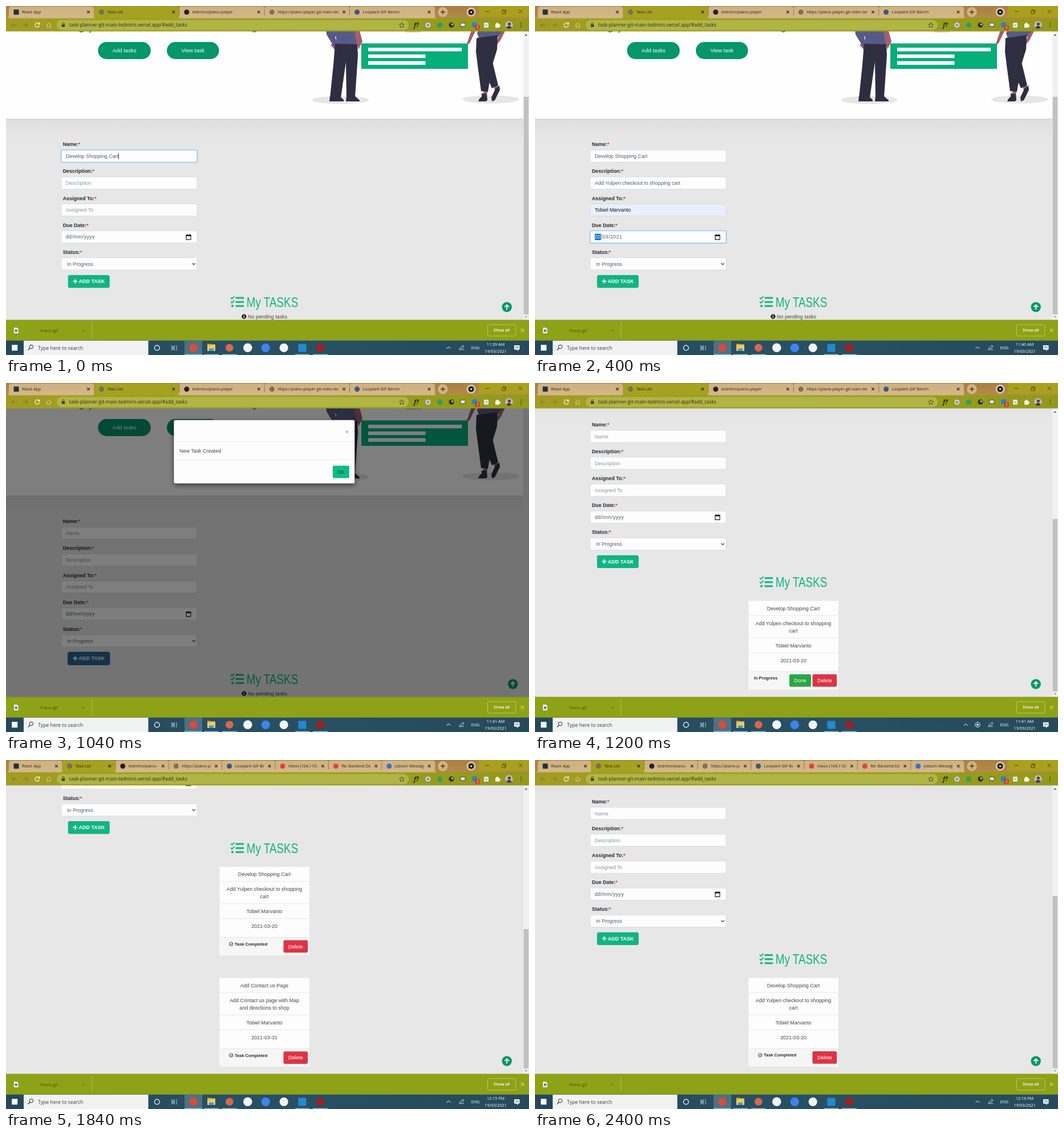
An HTML page that plays this animation: 917 by 611 pixels, repeating every 2.8 s.

```html
<!DOCTYPE html>
<html lang="en">
<head>
<meta charset="utf-8">
<title>Task planner</title>
<style>
  html, body { margin: 0; width: 100%; height: 100%; overflow: hidden; }
  svg { display: block; width: 100%; height: 100%; }
  text { font-family: "Liberation Sans", Arial, sans-serif; white-space: pre; }
  .ui text { font-family: "Open Sans", "Noto Sans", sans-serif; }
</style>
</head>
<body>
<svg id="stage" viewBox="0 0 917 611" preserveAspectRatio="none"></svg>
<script>
const STEP = 400;
const GREEN = '#10b581', DEEP = '#059669', INK = '#404549', MUTED = '#90959a';
const USER = 'tedmiro', PERSON = 'Tobiel Marvanto';

const rect = (x, y, w, h, fill, more = '') =>
  `<rect x="${x}" y="${y}" width="${w}" height="${h}" fill="${fill}" ${more}/>`;
const disc = (x, y, r, fill, more = '') =>
  `<circle cx="${x}" cy="${y}" r="${r}" fill="${fill}" ${more}/>`;
const shape = (d, fill) => `<path d="${d}" fill="${fill}"/>`;
const line = (d, color, width = 1, more = '') =>
  `<path d="${d}" fill="none" stroke="${color}" stroke-width="${width}" ${more}/>`;
const text = (x, y, s, size, fill, more = '') =>
  `<text x="${x}" y="${y}" font-size="${size}" fill="${fill}" ${more}>${s}</text>`;
const MID = 'text-anchor="middle"', BOLD = 'font-weight="700"';
const cross = (x, y, r, color, w = 1) =>
  line(`M${x - r} ${y - r}l${2 * r} ${2 * r}m0 ${-2 * r}l${-2 * r} ${2 * r}`, color, w);

const cart = { name: 'Develop Shopping Cart', about: ['Add Yulpen checkout to shopping', 'cart'], due: '2021-03-20' };
const contact = { name: 'Add Contact us Page', about: ['Add Contact us page with Map', 'and directions to shop'], due: '2021-03-31', done: true };
const cartDone = { ...cart, done: true };

const scenes = [
  { time: '11:39 AM', thumb: 159, values: [cart.name], focus: 0 },
  { time: '11:40 AM', thumb: 159, values: [cart.name, 'Add Yulpen checkout to shopping cart', PERSON, '20/03/2021'], focus: 3 },
  { time: '11:41 AM', pressed: true, modal: 'created' },
  { time: '11:41 AM', thumb: 238, scroll: 169.5, tasks: [cart], tray: true },
  { time: '12:15 PM', thumb: 296, scroll: 364, tasks: [cartDone, contact], many: true },
  { time: '12:16 PM', scroll: 364, tasks: [cartDone, contact], many: true, modal: 'delete' },
  { time: '12:16 PM', thumb: 238, scroll: 169.5, tasks: [cartDone], many: true }
];

const defs = `<defs>
  <linearGradient id="wood" x2="0" y2="1"><stop stop-color="#a9803f"/><stop offset="1" stop-color="#b58a4a"/></linearGradient>
  <linearGradient id="tab" x2="0" y2="1"><stop stop-color="#cfb180"/><stop offset="1" stop-color="#d4b888"/></linearGradient>
  <linearGradient id="bar" x2="1" y2="0"><stop stop-color="#a39c22"/><stop offset=".5" stop-color="#9ba01e"/><stop offset="1" stop-color="#93991b"/></linearGradient>
  <linearGradient id="fall" x2="0" y2="1"><stop stop-color="#000" stop-opacity=".035"/><stop offset="1" stop-color="#000" stop-opacity="0"/></linearGradient>
  <linearGradient id="dock" x2="1" y2="0"><stop stop-color="#24485a"/><stop offset=".5" stop-color="#285064"/><stop offset="1" stop-color="#264a5b"/></linearGradient>
  <clipPath id="view"><rect y="44" width="917" height="506"/></clipPath>
  <filter id="lift" x="-20%" y="-30%" width="140%" height="170%"><feDropShadow dx="0" dy="3" stdDeviation="4.5" flood-opacity=".5"/></filter>
</defs>`;

function people() {
  const dark = '#2f2e41', shirt = '#575a89', skin = '#a0616a';
  return `<ellipse cx="586.5" cy="164.5" rx="49.5" ry="7" fill="#e6e6e6"/><ellipse cx="850" cy="163.5" rx="50" ry="7" fill="#e6e6e6"/>` +
    shape('M575 64l6 12-4 1-8-9z', skin) +
    shape('M561 40H584L577 55 582 68 576 73 562 50ZM577 40H613L618 62 616 69 580 68Z', shirt) +
    shape('M610 40h9l6 22-7 14-3-10z', skin) +
    shape('M577 66L616 67 617 86 612 160H597L596 98 587 161H568L574 103Z', dark) +
    shape('M568 158h17l7 6v3h-25zM597 158h15l8 7v2h-24z', dark) +
    line('M700 45.3H727', '#aaa', 1) +
    rect(623, 65.5, 187, 44.5, '#06ae79') +
    [164, 100.5, 100.5].map((w, i) => rect(635, 73 + i * 11.8, w, 6.3, '#fff')).join('') +
    shape('M817 40h8l-12 25-6 4zM869 40h8l-10 20-9 11 2-8z', skin) +
    shape('M829 40H873L863 54 829 56 826 48Z', shirt) +
    shape('M838 146h7l-2 11h-7zM853 136h8l3 10-6 4z', skin) +
    shape('M825 56L862 51 861 76 853 102 845 150 833 149 827 104 824 80Z', dark) +
    shape('M835 84L853 98 863 139 852 144 838 112Z', dark) +
    shape('M834 153l9 1 1 11-3 2h-13q2-6 6-8zM858 145l7-6 1 8-9 18-5 2-1-7z', dark);
}

function hero() {
  const pill = (x, w, s) => rect(x, 63, w, 30, DEEP, 'rx="15"') + text(x + w / 2, 81.4, s, 9.55, '#fff', MID);
  return rect(0, 198, 907, 36, 'url(#fall)') + rect(0, 0, 907, 197.5, '#fefefe') +
    line('M0 197.7H907', '#c9c9c9', .7) +
    line('M128 43.5q4 3.5 8 0M146 46q3 0 4-4M432 43.5q3.5 3.5 7 0', DEEP, 1.8) +
    pill(161.3, 92.5, 'Add tasks') + pill(282, 91.5, 'View task') + people();
}

const labels = ['Name:', 'Description:', 'Assigned To:', 'Due Date:', 'Status:'];
const hints = ['Name', 'Description', 'Assigned To', 'dd/mm/yyyy', 'In Progress'];

function field(i, s) {
  const y = 252.2 + i * 47.15, value = (s.values || [])[i], focus = s.focus === i;
  const filled = i === 2 && value;
  let out = text(99.7, y - 7, `${labels[i]}<tspan fill="#e02f2f">*</tspan>`, 8.9, '#25292d', BOLD);
  if (focus) out += rect(95.6, y - 1, 241, 23.6, '#8cc3f2', 'rx="3" opacity=".55"');
  out += rect(97, y, 238, 21.2, filled ? '#e8f0fe' : '#fdfdfd', `rx="2.2" stroke="${focus ? '#6db3ee' : '#d0d4d8'}" stroke-width=".7"`);
  if (i === 3 && value) out += rect(104.8, y + 5, 10.8, 11.2, '#0f74d0');
  const color = filled ? '#111' : value || i > 2 ? '#555b60' : MUTED;
  const label = i === 3 && value ? `<tspan fill="#fff">${value.slice(0, 2)}</tspan>${value.slice(2)}` : value || hints[i];
  out += text(i === 4 ? 107 : 104.8, y + 13.8, label, 8.95, color, i === 3 ? 'letter-spacing=".35"' : '');
  if (focus && i === 0) out += line(`M197.3 ${y + 5.5}v10.5`, '#111', .8);
  if (i === 3) {
    out += line(`M316 ${y + 8}v7.2h8v-7.2z`, '#161616', 1.1) + rect(315.5, y + 6.7, 9, 2.6, '#161616') +
      line(`M317.8 ${y + 5.6}v2m4.4-2v2`, '#161616', 1);
  }
  if (i === 4) out += line(`M326.5 ${y + 9.4}l2.7 2.7 2.7-2.7`, '#33383c', 1.2);
  return out;
}

function addButton(pressed) {
  return (pressed ? rect(107.9, 470.4, 74.6, 23.8, '#6a9fd8', 'rx="3"') : '') +
    rect(109.2, 471.6, 72, 21.4, pressed ? '#2b6593' : GREEN, `rx="2.2" stroke="${pressed ? '#142c48' : '#0da875'}" stroke-width=".8"`) +
    line('M117.6 482h7.6m-3.8-3.8v7.6', '#fff', 1.9) +
    text(127.6, 485.3, 'ADD TASK', 8.95, '#fff', BOLD);
}

function heading() {
  let out = '';
  for (const y of [511, 518.2, 525.2]) out += rect(402.5, y - 1.5, 14.6, 3, GREEN, 'rx=".8"');
  out += line('M394 510.5l2.2 2.2 4.3-4.4M394 517.7l2.2 2.2 4.3-4.4', GREEN, 1.8) + disc(397, 525.2, 2.1, GREEN);
  return out + `<g transform="translate(421.8 526.8) scale(.82 1)">${text(0, 0, 'My TASKS', 23, GREEN)}</g>`;
}

function button(x, y, w, s, fill, color = '#fff') {
  return rect(x, y, w, 21.6, fill, 'rx="2.3"') + text(x + w / 2, y + 14, s, 8.95, color, MID);
}

function card(task, y) {
  const row = (dy, s) => text(453, y + dy + 3.2, s, 8.95, INK, MID);
  let out = rect(374.5, y, 157.5, 155, '#fdfdfd') + rect(374.5, y + 123.5, 157.5, 31.5, '#f6f6f6');
  out += line([25.5, 64.7, 90.7, 123.5].map(d => `M374.5 ${y + d}h157.5`).join(''), '#dedede', .7);
  out += row(13, task.name) + row(39, task.about[0]) + row(51.8, task.about[1]) + row(78, PERSON) + row(104, task.due);
  if (task.done) {
    out += disc(394.7, y + 135.2, 3.2, 'none', 'stroke="#25292d" stroke-width=".9"') +
      line(`M393 ${y + 135.2}l1.4 1.4 2.5-2.8`, '#25292d', .9) +
      text(401, y + 137.8, 'Task Completed', 7.5, '#25292d', BOLD);
  } else {
    out += text(383.8, y + 137.8, 'In Progress', 7.5, '#25292d', BOLD) + button(446, y + 128.6, 38, 'Done', '#28a745');
  }
  return out + button(486.5, y + 128.6, 42.7, 'Delete', '#dc3545');
}

function page(s) {
  const scroll = s.scroll || 0;
  let out = rect(0, 44, 917, 506, '#e7e7e7') + `<g transform="translate(0 ${-scroll})">` + hero();
  labels.forEach((_, i) => out += field(i, s));
  out += addButton(s.pressed) + heading();
  if (s.tasks) s.tasks.forEach((t, i) => out += card(t, 551 + i * 194.7));
  else {
    out += disc(417.4, 543.6, 4.2, '#25292d') + line('M417.4 541v1.2m0 .8v3', '#fff', 1.2) +
      text(424, 546.8, 'No pending tasks', 8.95, INK);
  }
  out += '</g>';
  const x = s.modal ? 888.7 : 878.2;
  out += disc(x, 527, 8.7, DEEP) + line(`M${x} 531.5v-8m-3.8 3.6l3.8-3.8 3.8 3.8`, '#fff', 1.8);
  if (s.modal) out += rect(0, 44, 917, 506, '#000', 'opacity=".5"') + modal(s.modal);
  else {
    out += rect(907, 44, 10, 506, '#f0f0f0') + rect(907.7, s.thumb, 8.6, 540 - s.thumb, '#c1c1c1') +
      shape('M909.5 52l2.3-3 2.3 3z', '#555') + shape('M909.5 543l2.3 3 2.3-3z', '#999');
  }
  return `<g clip-path="url(#view)">${out}</g>`;
}

function modal(kind) {
  const ask = kind === 'delete', d = ask ? 4.8 : 0;
  let out = rect(294.2, 64.7, 317.2, 111.2 + d, '#fdfdfd', 'rx="3" stroke="#000" stroke-opacity=".35" stroke-width=".7" filter="url(#lift)"') +
    line(`M294.6 ${102.3 + d}h316.5M294.6 ${134.5 + d}h316.5`, '#e2e5e8', .7) + cross(598, 85.5, 2.3, '#aaa', 1.1) +
    text(304, 122 + d, ask ? 'Are you sure you want to delete the task ?' : 'New Task Created', 8.95, INK);
  if (!ask) return out + button(572.8, 144.8, 29, 'OK', '#10bb84', '#24463a');
  return out + disc(315.7, 85.3, 10, '#f5dfe4') + shape('M312.6 83h6.4l-.6 6.8h-5.2z', '#d32552') +
    line('M311.8 82h8m-5.2-1.2h2.4', '#d32552', 1.2) +
    button(510.7, 149.5, 44, 'Cancel', '#10bb84', '#24463a') + button(560, 149.5, 42, 'Delete', '#10bb84') +
    rect(560, 149.5, 42, 21.6, 'none', 'rx="2.3" stroke="#8d9a70" stroke-width=".7"');
}

const tabs = [
  ['React App', '#20323c'], ['Task List', '#555f3a'], [`${USER}/piano-player`, '#222'],
  [`https://piano-player-git-main-${USER}`, '#6a6a62'], ['Looplark GIF Bench', '#3d5878'],
  ['Inbox (104,110)', '#d9473b'], ['Re: Backend Developer', '#d9473b'], ['Joblum Messages', '#3a70c8']
];

function globe(x, y) {
  return disc(x, y, 4.2, '#5d604c') + line(`M${x - 3} ${y - 1}q2-2 3 0t3 0M${x - 2} ${y + 2}h3`, '#c9c7a0', .8);
}

function browser(s) {
  const pitch = s.many ? 93.4 : 149.4, n = s.many ? 8 : 5;
  let out = rect(0, 0, 917, 22, 'url(#wood)') + rect(829, 0, 88, 19, '#aaa01d') + rect(0, 21, 917, 23.5, 'url(#bar)');
  tabs.slice(0, n).forEach(([name, color], i) => {
    const x = 5 + i * pitch, r = x + pitch;
    out += shape(`M${x - 3} 21.5q3 0 3-4V5q0-4 4-4H${r - 4}q4 0 4 4v12.5q0 4 3 4z`, i === 1 ? '#a5a121' : 'url(#tab)');
    if (i > 1) out += line(`M${x} 5.5v11`, '#7d6238', .7);
    out += i === 1 || i === 3 ? globe(x + 13, 10.7)
      : i === 0 ? rect(x + 8.5, 6.2, 9, 9, color, 'rx="1"') : disc(x + 13, 10.7, 4.5, color);
    out += `<clipPath id="t${i}"><rect x="${x + 23}" width="${pitch - 43}" height="21"/></clipPath>` +
      text(x + 23, 13.2, name, 7.15, '#2d2618', `clip-path="url(#t${i})"`) + cross(r - 10, 10.7, 2.2, '#2a2417', 1.1);
  });
  out += disc(766, 10.7, 8.7, '#d0b482') + line('M762 10.7h8m-4-4v8', '#292216', 1.2) +
    disc(815.6, 10.7, 8, '#d5c6a2') + disc(815.6, 10.7, 5, '#1c1a14') + shape('M813 9.7h5.2l-2.6 3z', '#fff') +
    line('M840.5 9.5h7', '#3d3a12', .9) + line('M870 8.5h5v5h-5zM871.5 8.3v-1.6h5v5h-1.4', '#3d3a12', .8) + cross(902, 9.5, 3, '#3d3a12', .9);

  out += line('M18.5 33H10m3.5-3.5L10 33l3.5 3.5M30.5 33H38m-3.5-3.5L38 33l-3.5 3.5', '#786f2c', 1) +
    line('M58.3 31.2a3.9 3.9 0 1 0 .5 3M58.8 28.7v3.2h-3.2', '#f5f3df', 1.3) +
    line('M71 33.5l4-4 4 4m-7-.5v4h6v-4', '#e2ddb0', .9) +
    rect(89, 24.4, 617, 17.8, '#b1b545', 'rx="8.9"') + rect(97.8, 32.2, 5.4, 4.4, '#3a3a18', 'rx=".6"') +
    line('M99 32v-1.4a1.5 1.5 0 0 1 3 0V32', '#3a3a18', .9) +
    text(110.8, 36.4, `task-planner-git-main-${USER}.vercel.app/#add_tasks`, 8.4, '#2c2e14') +
    line('M694 29l1.3 3 3.2.3-2.4 2.1.7 3.2-2.8-1.7-2.8 1.7.7-3.2-2.4-2.1 3.2-.3z', '#3a3a18', .8);

  out += text(719.5, 36.7, 'f?', 10, '#1c1c12', `${MID} ${BOLD} font-style="italic"`) +
    disc(740, 33.5, 4.6, '#cfcfe6') + disc(740, 33.5, 2, '#7a7da8') + disc(760.5, 33.5, 4.5, '#2f9d62') +
    disc(781, 33.3, 4.6, '#34342f') + disc(782.5, 32, 1.6, '#ddd') +
    rect(797, 30, 8, 5.8, '#f1f1f1', 'stroke="#333" stroke-width=".8"') +
    rect(817, 28.7, 9, 8.5, '#2a84cc', 'rx="1"') + rect(822.5, 33.6, 8, 8.2, '#d93025', 'rx="1.5"') +
    text(826.5, 40.2, '3', 6.5, '#fff', MID) +
    rect(838, 29.3, 8, 8.4, '#e7eaea', 'rx="1"') + line('M840 33.5h4', '#687c86', 1) +
    rect(858, 31, 7.3, 7, '#f7f7ed', 'rx=".8"') + disc(861.5, 30.6, 1.7, '#f7f7ed') + disc(865.5, 34.5, 1.7, '#f7f7ed') +
    disc(882, 33.4, 6.8, '#c6b4b8') + disc(882.5, 31.5, 2.5, '#473b42') + shape('M877 38q5-7 10 0-5 4-10 0z', '#473b42') +
    [29.8, 33.3, 36.8].map(y => disc(903, y, .9, '#33340f')).join('');
  return out;
}

function downloads() {
  return rect(0, 549.7, 917, 36, '#8da216') + line('M0 550H917', '#7d9016', .6) +
    shape('M14 563h5l2.5 2.5V573H14z', '#f5f7f2') + rect(15.7, 566.5, 4, 4, '#3a74b4') +
    text(60, 571.3, 'Piano.gif', 7.8, '#48540c') + line('M133.5 569.5l2.5-2.5 2.5 2.5', '#45500e', .9) +
    line('M150.8 553v29', '#b9c559', .8) +
    rect(844.5, 557.8, 49.3, 20, 'none', 'rx="2.2" stroke="#c8d27c" stroke-width=".8"') +
    text(869.2, 570.4, 'Show all', 7.1, '#fff', `${MID} font-weight="600"`) + cross(905.5, 567.8, 2.7, '#eef0d2', 1);
}

function taskbar(s) {
  let out = rect(0, 585.5, 917, 25.5, 'url(#dock)') + rect(10.2, 593.3, 10, 10, '#fff') +
    rect(31, 586, 218.5, 25, '#f1f2f2') + disc(44.3, 596.6, 3.3, 'none', 'stroke="#222" stroke-width="1"') +
    line('M42 599.2l-3.3 3.3', '#222', 1.1) + text(56, 602, 'Type here to search', 8.7, '#3b3d3f') +
    disc(264.8, 598.5, 4.4, 'none', 'stroke="#fff" stroke-width="1.3"') +
    line('M290.5 594v2h5v-2M290.5 603v-2h5v2M290.5 597.5h5v2h-5zM299 594v9', '#d9dfe3', .8) +
    rect(313, 586, 31, 25, '#4d7183') + disc(328.5, 598.2, 7, '#db4b3a') +
    rect(353, 592.5, 14, 11.5, '#f6cb55', 'rx="1"') + rect(353, 591.5, 6, 3, '#e3a93b') + rect(356, 599.5, 8, 4.5, '#3b9bd8') +
    disc(391.8, 598.3, 6.8, '#d8674b') + disc(423.8, 598.3, 7.8, '#f2f4f6') + disc(455.3, 598.3, 7.6, '#3f83ee') +
    disc(487.2, 598.3, 7.6, '#f4f4f4') + rect(512.5, 591.5, 14, 14, '#2489cf', 'rx="1"') + disc(551, 598.5, 7, '#a51e20');
  for (const [x, w] of [[313, 31], [347, 26], [379, 26], [507, 25], [538, 26]]) out += rect(x, 609.6, w, 1.4, '#7ec0ea');
  const caret = s.tray ? 755.5 : 776;
  out += line(`M${caret - 3.5} 600l3.5-3.5 3.5 3.5`, '#fff', 1);
  if (s.tray) out += disc(776, 598.3, 4.2, 'none', 'stroke="#fff" stroke-width="1"') + disc(776, 598.3, 1.9, '#fff');
  return out + line('M795 602l1-3 5-5 2 2-5 5-3 1M799 602q3-2 4 0', '#e8edf0', .9) +
    text(823, 601.3, 'ENG', 7.1, '#fff', MID) + text(858.5, 595.3, s.time, 7.2, '#fff', MID) +
    text(858.7, 606.8, '19/03/2021', 7.2, '#fff', MID) +
    shape('M891 594h9.5v7.5h-3v2.5l-2.5-2.5h-4z', '#fff') + line('M892.5 596.5h6.5m-6.5 2.3h6.5', '#2a4050', .7);
}

const stage = document.getElementById('stage');
let shown = -1;

function render(ms) {
  const k = Math.floor(ms / STEP) % scenes.length;
  if (k === shown) return;
  shown = k;
  const s = scenes[k];
  stage.innerHTML = defs + page(s) + `<g class="ui">${browser(s)}${downloads()}${taskbar(s)}</g>`;
}

const start = performance.now();
function tick() {
  render(performance.now() - start);
  requestAnimationFrame(tick);
}
tick();
</script>
</body>
</html>
```
